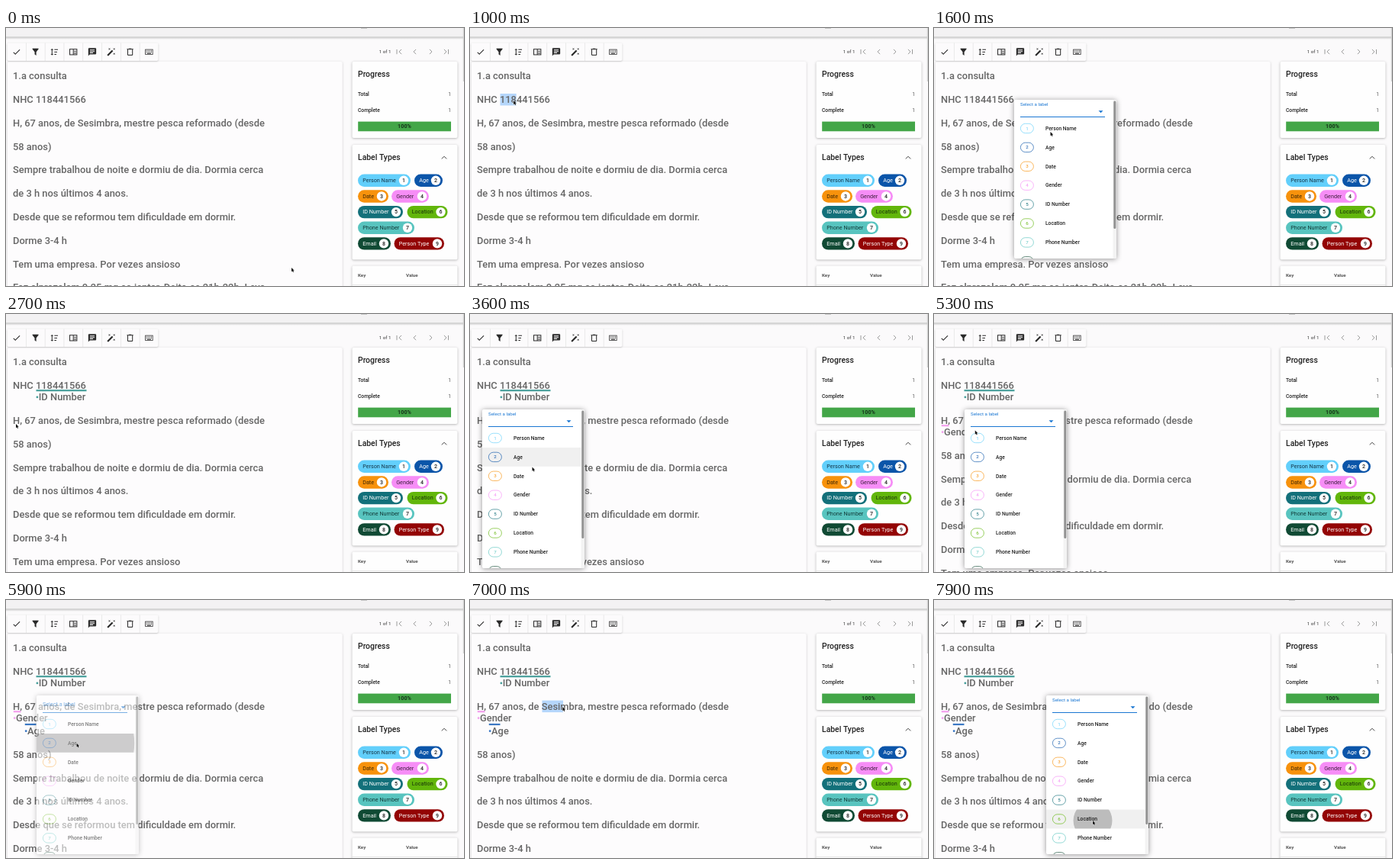
These frames come from a looping animation (600x338 px, 8 s). An HTML page with a canvas:

```html
<!DOCTYPE html>
<html lang="pt">
<head>
<meta charset="utf-8">
<title>Text annotation</title>
<style>
html, body { margin: 0; width: 100%; height: 100%; overflow: hidden; background: #fbfafb; }
canvas { display: block; width: 600px; height: 338px; }
</style>
</head>
<body>
<canvas id="stage"></canvas>
<script>
const W = 600, H = 338, LOOP = 8000;
const ratio = window.devicePixelRatio || 1;
const canvas = document.getElementById('stage');
const layer = document.createElement('canvas');
for (const c of [canvas, layer]) {
  c.width = W * ratio;
  c.height = H * ratio;
}
const stageCtx = canvas.getContext('2d');
const layerCtx = layer.getContext('2d');
let ctx = stageCtx;

const FONT = 'Roboto, Arial, sans-serif';
const BLUE = '#1976d2';
const BODY = 12.9, LINE = 30.8;

// name, colour, text colour, chip left, right, row
const LABELS = [
  ['Person Name', '#62cffb', '#17384a', 461, 530, 0],
  ['Age', '#0b55a9', '#fff', 535, 572, 0],
  ['Date', '#f7920c', '#3d2605', 461, 501, 1],
  ['Gender', '#f68df6', '#40203f', 505, 554, 1],
  ['ID Number', '#13707a', '#fff', 461, 520, 2],
  ['Location', '#62b60b', '#17300a', 525.5, 578.5, 2],
  ['Phone Number', '#58c4bf', '#123b39', 461, 535, 3],
  ['Email', '#104a34', '#fff', 461, 504, 4],
  ['Person Type', '#930404', '#fff', 508.5, 574, 4]
];

const LINES = [
  '1.a consulta',
  'NHC 118441566',
  'H, 67 anos, de Sesimbra, mestre pesca reformado (desde',
  '58 anos)',
  'Sempre trabalhou de noite e dormiu de dia. Dormia cerca',
  'de 3 h nos últimos 4 anos.',
  'Desde que se reformou tem dificuldade em dormir.',
  'Dorme 3-4 h',
  'Tem uma empresa. Por vezes ansioso',
  'Faz alprazolam 0.25 mg ao jantar. Deita-se 21h-22h. Leva'
];

// Extra space that opens above a line once a label has been set
const TAGS = [
  { at: 1950, line: 2, gap: 15.2, x: 39.5, x2: 105.5, barY: 100.2, y: 108.8, name: 'ID Number', color: '#479f9b' },
  { at: 3850, line: 3, gap: 14.9, x: 9.8, x2: 19.5, barY: 146.2, y: 154.6, name: 'Gender', color: '#f3a0ee' },
  { at: 5850, line: 3, gap: 17.1, x: 24.8, x2: 39.5, barY: 163, y: 171.6, name: 'Age', color: '#3b78c4' }
];

const MENUS = [
  { x: 105, y: 94, open: 1250, click: 1800, close: 1950 },
  { x: 16, y: 125, open: 3220, click: 3740, close: 3800 },
  { x: 40, y: 125, open: 5050, click: 5675, close: 5810 },
  { x: 147, y: 125, open: 7250, click: 7825, close: 9000 }
];

const SELECTIONS = [
  { from: 880, drag: 1200, end: 1400, x: 39.5, x2: 105.5, y: 94 },
  { from: 2950, drag: 3100, end: 3300, x: 10, x2: 19, y: 139.6 },
  { from: 4780, drag: 4950, end: 5150, x: 24.8, x2: 39.5, y: 139.6 },
  { from: 6850, drag: 7150, end: 7350, x: 94.5, x2: 149, y: 139.6 }
];

// time, x, y
const MOUSE = [
  [0, 374, 314], [50, 374, 314], [300, 129, 129], [450, 129, 129],
  [850, 40, 95], [900, 40, 95], [1200, 105, 95], [1500, 105, 95],
  [1600, 152.5, 136], [1780, 158, 231], [2200, 158, 231], [2700, 13, 144],
  [2900, 10, 141], [2960, 10, 141], [3100, 17, 141], [3250, 17, 141],
  [3600, 81.5, 200.5], [3720, 84, 237], [4050, 84, 237], [4700, 27, 140],
  [4780, 25, 140], [4950, 40, 140], [5150, 40, 140], [5600, 92.5, 187.5],
  [6300, 92.5, 187.5], [6800, 95, 140], [6850, 95, 140], [7150, 147, 140],
  [7350, 147, 140], [7750, 208, 289], [8000, 208, 289]
];

const ICONS = [
  'M21 7 9 19 3.5 13.5 4.9 12.1 9 16.2 19.6 5.6z',
  'M14 12v9l-4-3V12L4.2 4.6A1 1 0 0 1 5 3h14a1 1 0 0 1 .8 1.6z',
  'M7 7h2.5L6 3.5 2.5 7H5v10H2.5L6 20.5 9.5 17H7z M12 5h9v2h-9z m0 6h7v2h-7z m0 6h5v2h-5z',
  'M2 4h20v16H2z M4 6v12h7V6z M13 6v12h7V6z M14 9h5v1.5h-5z m0 3h5v1.5h-5z m0 3h5v1.5h-5z',
  'M4 2h16a2 2 0 0 1 2 2v12a2 2 0 0 1-2 2H6l-4 4V4a2 2 0 0 1 2-2z M6 6v2h12V6z m0 4v1.5h12V10z m0 3v2h8v-2z',
  'M1.5 19.5 14 7l3 3L4.5 22.5z M7.5 5.6 5 7l1.4-2.5L5 2l2.5 1.4L10 2 8.6 4.5 10 7z M19.5 15.4 22 14l-1.4 2.5L22 19l-2.5-1.4L17 19l1.4-2.5L17 14z M22 2l-1.4 2.5L22 7l-2.5-1.4L17 7l1.4-2.5L17 2l2.5 1.4z',
  'M9 3v1H4v2h1v13a2 2 0 0 0 2 2h10a2 2 0 0 0 2-2V6h1V4h-5V3z M7 6h10v13H7z',
  'M2 5h20v14H2z M3.5 6.5v11h17v-11z M5 8h2v2H5z m4 0h2v2H9z m4 0h2v2h-2z m4 0h2v2h-2z M5 11h2v2H5z m4 0h2v2H9z m4 0h2v2h-2z m4 0h2v2h-2z M7 14.5h10v2H7z'
].map(d => new Path2D(d));

const clamp = v => Math.max(0, Math.min(1, v));
const ease = v => v * v * (3 - 2 * v);
const mix = (a, b, k) => a + (b - a) * k;

function rect(x, y, w, h, color) {
  ctx.fillStyle = color;
  ctx.fillRect(x, y, w, h);
}

function roundRect(x, y, w, h, r, color) {
  ctx.beginPath();
  ctx.roundRect(x, y, w, h, r);
  ctx.fillStyle = color;
  ctx.fill();
}

function disc(x, y, r, color) {
  ctx.beginPath();
  ctx.arc(x, y, r, 0, 7);
  ctx.fillStyle = color;
  ctx.fill();
}

// Text whose capitals are centred on cy
function text(str, x, cy, size, color, weight = 400, align = 'left') {
  ctx.font = `${weight} ${size}px ${FONT}`;
  ctx.textAlign = align;
  ctx.fillStyle = color;
  ctx.fillText(str, x, cy + size * 0.33);
}

function line(points, color, width) {
  ctx.beginPath();
  points.forEach(([x, y]) => ctx.lineTo(x, y));
  ctx.strokeStyle = color;
  ctx.lineWidth = width;
  ctx.stroke();
}

function card(x, y, w, h, color = '#fefefe', blur = 3, shade = 0.3) {
  ctx.save();
  ctx.shadowColor = `rgba(0,0,0,${shade})`;
  ctx.shadowBlur = blur * ratio;
  ctx.shadowOffsetY = 0.8 * ratio;
  roundRect(x, y, w, h, 2, color);
  ctx.restore();
}

function mouseAt(t) {
  const i = Math.max(1, MOUSE.findIndex(p => p[0] >= t));
  const [t0, x0, y0] = MOUSE[i - 1], [t1, x1, y1] = MOUSE[i];
  const k = ease(clamp((t - t0) / (t1 - t0)));
  return [mix(x0, x1, k), mix(y0, y1, k)];
}

function drawHeader() {
  rect(0, 0, W, 12, '#f3f2f3');
  const shade = ctx.createLinearGradient(0, 11.5, 0, 15);
  shade.addColorStop(0, '#c2c2c2');
  shade.addColorStop(1, '#fbfafb');
  rect(0, 11.5, W, 3.5, shade);
  rect(465, 0, 8, 0.7, '#b0b0b0');
}

function drawToolbar() {
  card(1.5, 19.5, 198, 23.5, '#fcfbfc', 2, 0.2);
  ICONS.forEach((icon, i) => {
    const x = 1.5 + 24.8 * i;
    if (i) rect(x - 0.3, 19.5, 0.7, 23.5, '#e2e2e2');
    ctx.save();
    ctx.translate(x + 6.1, 25.2);
    ctx.scale(0.516, 0.516);
    ctx.fillStyle = '#2a2a2a';
    ctx.fill(icon, 'evenodd');
    ctx.restore();
  });
}

function drawPager() {
  text('1 of 1', 488.7, 31, 6.19, '#333');
  const chevron = (x, dir) =>
    line([[x - dir * 1.6, 28], [x + dir * 1.5, 31.1], [x - dir * 1.6, 34.2]], '#999', 1);
  chevron(516.5, -1);
  chevron(535.5, -1);
  chevron(556.5, 1);
  chevron(575.5, 1);
  rect(511.5, 28, 1, 6.2, '#999');
  rect(579, 28, 1, 6.2, '#999');
}

function drawSidebar() {
  card(453.5, 44, 138, 100);
  text('Progress', 461, 60.3, 10.4, '#222', 500);
  text('Total', 461, 87.2, 6.7, '#222', 500);
  text('Complete', 461, 108, 6.7, '#222', 500);
  text('1', 583, 87.2, 6.7, '#555', 400, 'right');
  text('1', 583, 108, 6.7, '#555', 400, 'right');
  rect(461.2, 122.6, 121.8, 12.7, '#43a648');
  text('100%', 522, 129, 7.22, '#15321a', 700, 'center');

  card(453.5, 153, 138, 150.5);
  text('Label Types', 461, 170, 10.4, '#222', 500);
  line([[570.8, 171.4], [574, 168.2], [577.2, 171.4]], '#444', 1);
  LABELS.forEach(([name, color, ink, left, right, row], i) => {
    const y = 199.8 + 20.65 * row;
    roundRect(left, y - 8.2, right - left, 16.4, 8.2, color);
    text(name, left + 6.2, y, 7.22, ink);
    disc(right - 9, y, 6.2, '#fff');
    text(String(i + 1), right - 9, y, 7, '#222', 500, 'center');
  });

  card(453.5, 311.5, 138, 40);
  text('Key', 461, 324.2, 6.2, '#555', 700);
  text('Value', 524, 324.2, 6.2, '#555', 700);
  rect(453.5, 336, 138, 0.7, '#ddd');
  rect(598.8, 0, 1.2, 70, '#cfcfcf');
}

function drawDocument(t) {
  card(1.8, 44, 439, 320, '#fdfcfd', 2.5, 0.22);
  SELECTIONS.forEach(s => {
    if (t < s.from || t >= s.end) return;
    const k = ease(clamp((t - s.from) / (s.drag - s.from)));
    rect(s.x, s.y - 8, (s.x2 - s.x) * k, 15.5, '#b5d6fb');
  });
  const tags = TAGS.filter(tag => t >= tag.at);
  LINES.forEach((str, i) => {
    const shift = tags.reduce((sum, tag) => sum + (i >= tag.line ? tag.gap : 0), 0);
    text(str, 9, 63 + LINE * i + shift, BODY, '#666', 500);
  });
  tags.forEach(tag => {
    rect(tag.x, tag.barY - 1.1, tag.x2 - tag.x, 2.2, tag.color);
    disc(tag.x + 1.4, tag.y + 0.1, 1.4, tag.color);
    text(tag.name, tag.x + 3.2, tag.y, BODY, '#666', 500);
  });
}

function drawMenu(menu, t) {
  const alpha = clamp((t - menu.open) / 140) * (1 - clamp((t - menu.close) / 210));
  if (!alpha) return;

  // The panel is drawn solid on its own layer, then faded as a whole
  ctx = layerCtx;
  ctx.setTransform(ratio, 0, 0, ratio, 0, 0);
  ctx.clearRect(0, 0, W, H);
  ctx.save();
  ctx.translate(menu.x, menu.y);
  card(0, 0, 134, 208, '#fff', 7, 0.42);
  ctx.beginPath();
  ctx.roundRect(0, 0, 134, 208, 2);
  ctx.clip();
  drawMenuBody(menu, t);
  ctx.restore();

  ctx = stageCtx;
  ctx.globalAlpha = alpha;
  ctx.drawImage(layer, 0, 0, W, H);
  ctx.globalAlpha = 1;
}

function drawMenuBody(menu, t) {
  // The caption drops back into the field when focus leaves it
  const drop = clamp((t - menu.close) / 150);
  text('Select a label', 8, mix(5.6, 15.4, drop), mix(6.2, 7.9, drop), BLUE);
  ctx.fillStyle = BLUE;
  ctx.beginPath();
  ctx.moveTo(110.5, 14.2);
  ctx.lineTo(116.5, 14.2);
  ctx.lineTo(113.5, 17.2);
  ctx.fill();
  rect(8, 22, 111, 1, BLUE);

  const [hx, hy] = mouseAt(t - 80);
  const [mx, my] = mouseAt(Math.min(t, menu.click));
  const over = hx > menu.x ? Math.floor((hy - menu.y - 25.1) / 24.9) : -1;
  LABELS.slice(0, 8).forEach(([name, color], i) => {
    const y = 37.5 + 24.9 * i, top = y - 12.4;
    if (i === over) {
      rect(0, top, 130, 24.8, 'rgba(0,0,0,.06)');
      if (t >= menu.click) drawRipple(mx - menu.x, my - menu.y, top, t - menu.click);
    }
    ctx.strokeStyle = color;
    ctx.lineWidth = 0.65;
    ctx.beginPath();
    ctx.roundRect(8.4, y - 6.2, 17, 12.4, 6.2);
    ctx.stroke();
    text(String(i + 1), 16.9, y, 6.2, color, 400, 'center');
    text(name, 41, y, 6.7, '#222', 500);
  });

  rect(129.5, 0, 4.5, 208, '#f3f3f3');
  roundRect(130.3, 1.5, 3, 167.5, 1.5, '#929292');
}

function drawRipple(x, y, top, age) {
  ctx.save();
  ctx.beginPath();
  ctx.rect(0, top, 130, 24.8);
  ctx.clip();
  disc(x, y, age * 0.335, `rgba(0,0,0,${0.18 + 0.13 * clamp(age / 250)})`);
  ctx.restore();
}

function drawMouse(t) {
  const [x, y] = mouseAt(t);
  ctx.save();
  ctx.translate(x, y);
  ctx.beginPath();
  [[0, 0], [0, 5.2], [1.2, 4.2], [2, 6], [3, 5.6], [2.2, 3.8], [3.7, 3.7]]
    .forEach(p => ctx.lineTo(...p));
  ctx.closePath();
  ctx.strokeStyle = '#fff';
  ctx.lineWidth = 1;
  ctx.stroke();
  ctx.fillStyle = '#111';
  ctx.fill();
  ctx.restore();
}

function draw(t) {
  ctx.setTransform(ratio, 0, 0, ratio, 0, 0);
  rect(0, 0, W, H, '#fbfafb');
  drawDocument(t);
  drawHeader();
  drawToolbar();
  drawPager();
  drawSidebar();
  MENUS.forEach(menu => drawMenu(menu, t));
  drawMouse(t);
}

const start = performance.now();
function tick() {
  draw((performance.now() - start) % LOOP);
  requestAnimationFrame(tick);
}
tick();
</script>
</body>
</html>
```
